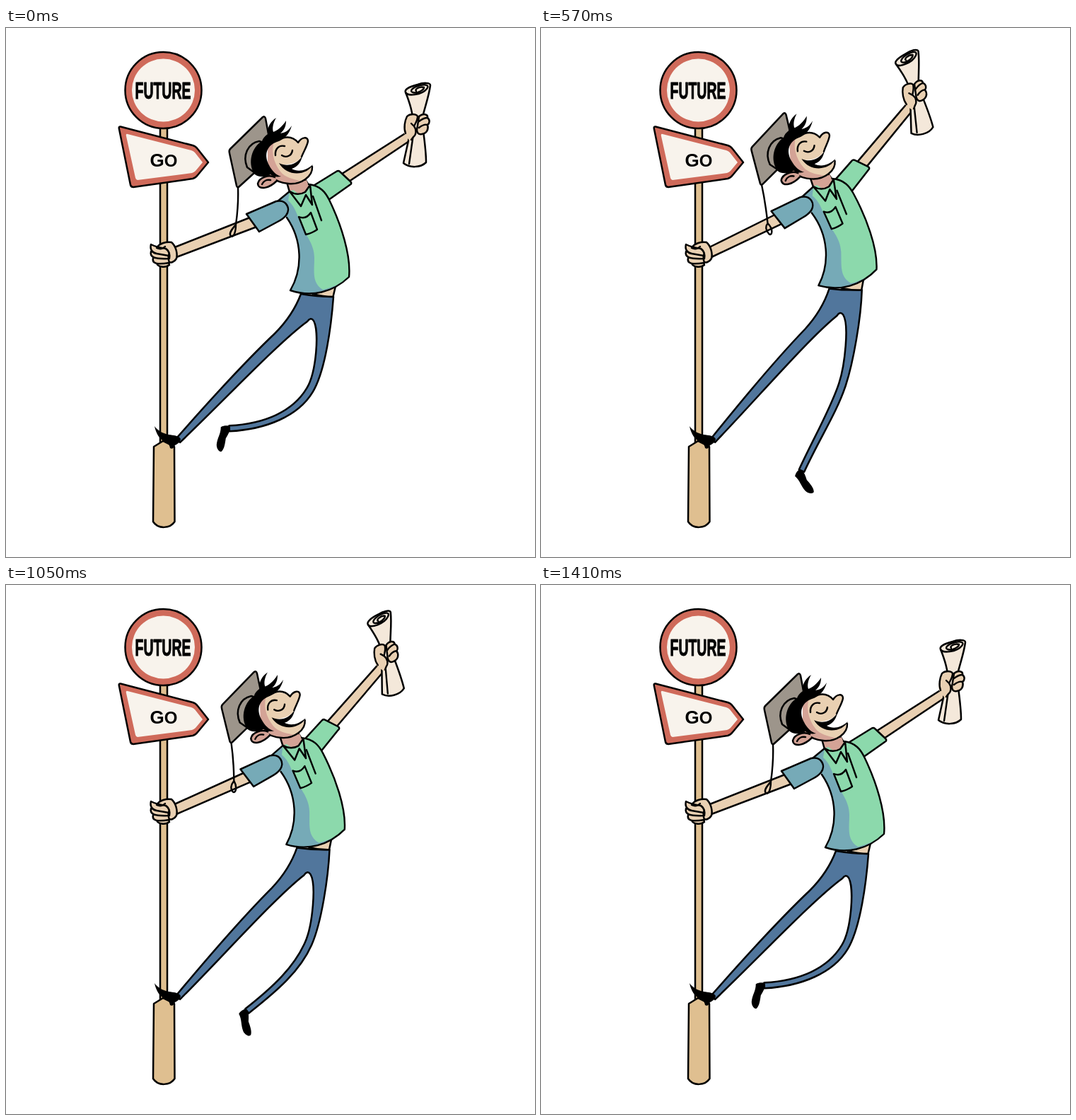
Animation, 748 px wide and 748 px high, one loop 1.44 s. Source, as an HTML page:

```html
<!DOCTYPE html>
<html lang="en">
<head>
<meta charset="utf-8">
<title>Graduate</title>
<style>
html, body { margin: 0; width: 100%; height: 100%; overflow: hidden; background: #fff; }
svg { display: block; width: 100%; height: 100%; }
svg * { stroke-linejoin: round; stroke-linecap: round; }
.ink { stroke: #000; stroke-width: 2.5; }
.line { fill: none; stroke: #000; stroke-width: 2.4; }
.wood { fill: #dfbf90; }
.red { fill: #cf6a5a; }
.paper { fill: #f8f3ec; }
.scroll { fill: #f4e8da; }
.skin { fill: #e9d0b2; }
.rose { fill: #d4a396; }
.gray { fill: #9d958b; }
.teal { fill: #76aab7; }
.green { fill: #8cd9ac; }
.jeans { fill: #51769c; }
text { font-family: "Liberation Sans", Arial, sans-serif; font-weight: bold; }
</style>
</head>
<body>
<svg viewBox="0 0 748 748">
  <!-- sign post -->
  <path class="wood ink" d="M218 140V588H228V140Z"/>
  <path class="wood ink" d="M209 592L222 584L238 592L238.500 698C232 708 215 709 208 698Z"/>
  <circle class="red ink" cx="222.500" cy="88" r="54"/>
  <circle class="paper" cx="222.500" cy="88" r="44.500"/>
  <text transform="translate(222 100.300) scale(.6 1)" text-anchor="middle" font-size="32.500" stroke="#000">FUTURE</text>
  <path class="red ink" d="M162 139.500L264 166Q268 167 271 171L286 190L271 208Q268 212 264 213L180 225Q177 225 176 222L160 143Q159 139 162 139.500Z"/>
  <path class="paper" d="M172 150L262 173Q265 174 267 176L278 190L268 202Q266 204 263 205L186 215Q184 215 183 212L170 153Q169 149 172 150Z"/>
  <text x="203.500" y="196" font-size="26">G<tspan font-size="24">O</tspan></text>

  <path id="shoe" d="M-12-2C-7-5-1-4 2-3C1 4-2 9-5 14C-6 21-7 29-11 32.500C-14 34-18 29-18 23C-17 13-12 8-12-2Z"/>
  <path id="pants" class="jeans ink"/>
  <path id="forearm" class="skin ink"/>

  <g id="body">
    <path class="skin ink" d="M434 370L466 365L462.500 380Q448 380 434 376Z"/>

    <g id="arm">
      <path class="skin ink" d="M458 217L566 148L576 156L470 227Z"/>
      <path class="green ink" d="M420 232L467 203Q470 201 472 203L487 217Q490 220 486 222L452 246Z"/>
      <g id="scroll">
        <path class="scroll ink" d="M565 91C571 106 575 118 575 130C571 152 566 172 562 191C570 198 586 198 594 190C594 170 590 148 588 130C592 112 598 97 600 81C600 77 590 77 582 80C570 83 563 87 565 91Z"/>
        <path class="line" d="M565 91C567 97 588 95 595 86C599 81 594 79 585 81C575 84 570 89 575 91C581 93 591 88 591 84C585 82 577 87 580 89M576 150L570 192"/>
      </g>
      <path class="skin ink" d="M584 125C590 120 597 122 596 127C600 130 599 135 596 137C598 143 595 149 588 150C583 151 581 148 581 144Z"/>
      <path class="line" d="M584 132C589 128 593 127 596 127M584 141C589 137 593 136 596 137"/>
      <path class="skin" d="M563 149C561 141 564 131 567 125C571 121 580 121 582 125C582 131 578 136 577 139C581 144 580 151 576 154L571 160Z"/>
      <path class="line" d="M565 149C562 141 564 131 567 125C571 121 580 121 582 125C582 131 578 136 577 139C581 144 580 151 576 154L573 158M577 139L573 135"/>
    </g>

    <!-- shirt -->
    <path class="rose ink" d="M397 218L423 214L431 227L414 244L401 232Z"/>
    <path class="teal" d="M384 245L401 231L430 221C445 223 452 233 457 243C474 278 488 322 485 352C462 374 432 381 402 371C420 340 419 300 397 268Z"/>
    <path class="green" d="M401 231L430 221C445 223 452 233 457 243C474 278 488 322 485 352C474 362 461 367 448 370C432 360 436 344 436 325C436 304 422 292 415 273C411 262 408 252 399 244Z"/>
    <path class="rose" d="M402 226L425 215L428 223L420 239Z"/>
    <path class="line" d="M384 245L401 231M428 221C445 223 452 233 457 243C474 278 488 322 485 352C462 374 432 381 402 371C420 340 419 300 397 268"/>
    <path class="green ink" d="M401 231L417 252L424 236L433 250L430 222L423 232Q412 238 401 231Z"/>
    <path class="line" d="M434 238L446 272M414 267C421 270 427 267 431 261L440 285Q433 290 424 292Z"/>
    <path class="teal ink" d="M340 263L382 245C397 242 403 256 396 265C392 270 388 272 384 274L358 288Z"/>

    <!-- cap and head -->
    <path class="gray ink" d="M363 126L317 171Q315 173 316 177L326 223Q327 227 330 224L352 204L372 155L367 128Q366 124 363 126Z"/>
    <path class="gray ink" d="M341 197C334 180 342 163 358 160L370 164L352 205Z"/>
    <path class="skin" d="M371 165C380 157 399 150 413 162C418 154 427 153 427 160C426 167 421 174 418 182C413 190 402 194 389 193C397 205 420 210 433 196C434 210 417 222 399 220C387 219 378 214 371 206Z"/>
    <path class="rose" d="M370 163L380 158C374 173 378 190 388 203C394 211 406 214 416 216C401 223 383 219 370 207Z"/>
    <path class="line" d="M384 159C396 152 406 154 413 162C418 154 427 153 427 160C426 167 421 174 418 182M433 196C434 210 417 222 399 220C387 219 380 215 374 210"/>
    <path d="M386 191C398 197 411 193 419 181C417 191 411 197 404 199C413 204 424 202 434 193C427 208 398 212 386 191Z"/>
    <path class="line" d="M381 180C380 171 386 165 394 167M390 180C396 184 404 181 405 173"/>
    <path class="rose ink" d="M380 211C372 207 358 211 356 220C357 230 372 227 383 216"/>
    <path class="line" d="M362 221C364 216 369 214 374 215"/>
    <path d="M362 160C348 168 341 190 351 206C356 212 369 211 374 207C377 210 382 211 389 210C382 208 376 202 372 194C365 181 367 167 383 161C393 158 401 150 404 138C399 146 394 148 388 149C394 144 396 138 396 131C391 139 384 145 378 147C376 141 378 134 382 127C374 132 369 141 370 150C366 153 363 156 362 160Z"/>
  </g>

  <path id="tassel" class="line"/>

  <!-- hand on the post, standing shoe -->
  <path class="skin ink" d="M213 311C217 304 227 302 234 303C240 308 243 319 241 326C238 331 233 333 229 330L214 319Z"/>
  <path class="skin ink" d="M213 331C213 339 226 339 231 335L229 328Z"/>
  <path class="skin ink" d="M208 325C206 333 213 335 231 332L229 324Z"/>
  <path class="skin ink" d="M205 316C203 324 210 327 230 326L229 318Z"/>
  <path class="skin ink" d="M205 306C203 313 207 318 213 319L230 322C232 318 229 314 226 312C219 311 211 309 205 306Z"/>
  <path class="line" d="M213 311C219 314 223 311 225 309M226 312C231 316 232 321 231 326"/>
  <path d="M210 563C215 570 222 573 230 575C237 576 244 576 247 581C246 586 243 588 239 590C237 594 235 596 232 594C231 588 228 586 223 584C217 581 212 573 210 563Z"/>
</svg>
<script>
const LOOP = 1440, STEP = 30, END = 1410;
const PIVOT = { x: 242, y: 583 }, SHOULDER = '440 242', GRIP = '579 140';
const LEAN = 2.85, SWING = 20.4;

const $ = id => document.getElementById(id);
const set = (id, name, value) => $(id).setAttribute(name, value);
const rad = deg => deg * Math.PI / 180;
const xy = (x, y) => `${x.toFixed(2)} ${y.toFixed(2)} `;

// cosine ease from 0 at time a to 1 at time b
function ease(t, a, b) {
  const x = Math.min(1, Math.max(0, (t - a) / (b - a)));
  return (1 - Math.cos(Math.PI * x)) / 2;
}

// point on a limb: "along" follows the angle, "out" goes to its outer side
function limb(point, deg) {
  const c = Math.cos(rad(deg)), s = Math.sin(rad(deg));
  return (along, out) => xy(point.x + along * c + out * s, point.y + along * s - out * c);
}

// trousers: standing leg leans with the body, free leg bends at the knee
function drawLegs(turn, at, kick) {
  const knee = turn(429.5, 512);
  const shin = rad(154.5 - 41 * kick), len = 126 + 10 * kick * kick;
  const foot = { x: knee.x + len * Math.cos(shin), y: knee.y + len * Math.sin(shin) };
  const k = limb(knee, 121 - 13.5 * kick), a = limb(foot, 177 - 65 * kick);
  set('pants', 'd',
    `M${at(463, 380)}C${at(460, 420)}${k(-35, 5)}${k(0, 5)}C${k(40, 5)}${a(-52, 4)}${a(0, 4)}` +
    `L${a(0, -4)}C${a(-51, -4)}${k(38, -5)}${k(0, -5)}C${k(-27, -5)}${at(443, 428)}${at(435, 414)}` +
    `Q${at(431, 408)}${at(426, 415)}C${at(385, 445)}${at(310, 525)}${at(246, 586)}` +
    `L${at(241, 580)}C${at(285, 530)}${at(340, 470)}${at(380, 432)}` +
    `C${at(396, 416)}${at(408, 400)}${at(417, 376)}Q${at(440, 380)}${at(463, 380)}Z`);
  set('shoe', 'transform', `translate(${xy(foot.x, foot.y)}) rotate(${-51 * kick})`);
}

// the tassel hangs from the cap corner, its knot stays almost in place
function drawTassel(at, s) {
  const x = 325 - 5 * s, y = 278 - 2 * s, ex = 319 + 5 * s, ey = 295 - 3 * s;
  set('tassel', 'd',
    `M${at(328, 225)}Q${xy(329 - 13 * s, 250 - 4 * s)}${xy(x, y)}` +
    `C${xy(x - 4, y + 5)}${xy(ex - 5, ey - 5)}${xy(ex - 1, ey - 1)}` +
    `C${xy(ex + 3, ey + 2)}${xy(ex + 6, ey - 7)}${xy(x, y)}`);
}

function draw(t) {
  const s = t < 720 ? ease(t, 0, 720) : ease(t, END, 720);
  const tilt = LEAN * s;
  const swing = SWING * (ease(t, 100, 740) - ease(t, 885, END));
  const c = Math.cos(rad(tilt)), n = Math.sin(rad(tilt));
  const turn = (x, y) => {
    const dx = x - PIVOT.x, dy = y - PIVOT.y;
    return { x: PIVOT.x + dx * c + dy * n, y: PIVOT.y - dx * n + dy * c };
  };
  const at = (x, y) => { const p = turn(x, y); return xy(p.x, p.y); };

  set('body', 'transform', `rotate(${-tilt} ${PIVOT.x} ${PIVOT.y})`);
  set('arm', 'transform', `rotate(${tilt - swing} ${SHOULDER})`);
  set('scroll', 'transform', `rotate(${swing * .17} ${GRIP})`);
  set('forearm', 'd', `M236 311L${at(350, 266)}L${at(360, 279)}L241 324Z`);
  drawLegs(turn, at, 1.08 * Math.pow(s, 1.1));
  drawTassel(at, s);
}

function tick(now) {
  draw(Math.floor(now % LOOP / STEP) * STEP);
  requestAnimationFrame(tick);
}
draw(0);
requestAnimationFrame(tick);
</script>
</body>
</html>
```
